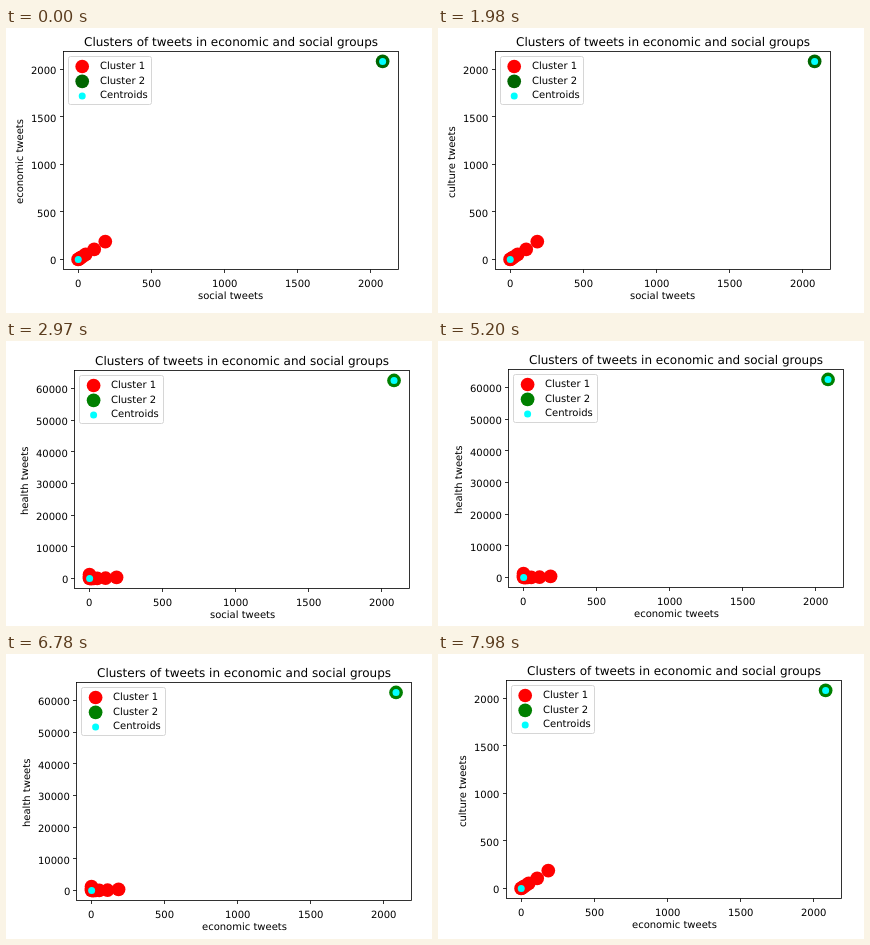
Animation of 426x285 px, one loop 8000 ms. Source, as an HTML page with a canvas:

```html
<!DOCTYPE html>
<html lang="en">
<head>
<meta charset="utf-8">
<title>Tweet clusters</title>
<style>
  html, body { margin: 0; width: 100%; height: 100%; overflow: hidden; background: #fff; }
  canvas { display: block; width: 426px; height: 285px; }
</style>
</head>
<body>
<canvas id="stage" width="426" height="285"></canvas>
<script>
const ctx = document.getElementById('stage').getContext('2d');
const LOOP = 8000;
const WIDTH = 335, HEIGHT = 218, X_UNIT = 0.1462;
const BIG = 6.87, SMALL = 3.5;
const RED = '#ff0000', CYAN = '#00ffff', INK = '#000';

// Each y scale: tick step, last tick, pixels per unit and the far cluster's value.
const HUNDREDS = { step: 500, last: 2000, unit: 0.095, far: 2084, labelGap: 40,
  points: [[0, 0], [4, 3], [10, 8], [18, 18], [34, 33], [52, 52], [110, 105], [186, 188]] };
const THOUSANDS = { step: 10000, last: 60000, unit: 0.095 / 30, far: 62500, labelGap: 46,
  points: [[0, 1200], [0, 500], [0, 0], [12, -100], [30, 0], [53, 0], [110, 50], [185, 300]] };

const SCENES = [
  { at: 0, left: 57, top: 23, x: 'social', y: 'economic', scale: HUNDREDS, green: '#006600' },
  { at: 500, left: 57, top: 23, x: 'social', y: 'culture', scale: HUNDREDS, green: '#006600' },
  { at: 2970, left: 68.4, top: 29, x: 'social', y: 'health', scale: THOUSANDS, green: '#008000' },
  { at: 5200, left: 70.4, top: 28, x: 'economic', y: 'health', scale: THOUSANDS, green: '#008000' },
  { at: 7830, left: 70.4, top: 28, x: 'economic', y: 'health', scale: THOUSANDS, green: '#008000', pointer: true },
  { at: 7980, left: 68, top: 26, x: 'economic', y: 'culture', scale: HUNDREDS, green: '#008000' }
];

const snap = v => Math.floor(v) + 0.5;

function dot(x, y, radius, color) {
  ctx.fillStyle = color;
  ctx.beginPath();
  ctx.arc(x, y, radius, 0, Math.PI * 2);
  ctx.fill();
}

// Text starts on a whole pixel; anchor is 0 for left, 0.5 for centre, 1 for right.
function text(label, x, y, anchor = 0.5, size = 10) {
  ctx.font = `${size}px "DejaVu Sans", sans-serif`;
  ctx.fillStyle = INK;
  const width = ctx.measureText(label).width;
  ctx.fillText(label, Math.round(x - width * anchor), Math.round(y));
}

function line(x1, y1, x2, y2) {
  ctx.beginPath();
  ctx.moveTo(x1, y1);
  ctx.lineTo(x2, y2);
  ctx.stroke();
}

function drawData(scene, originX, originY) {
  const { points, unit, far } = scene.scale;
  const plot = (x, y, radius, color) =>
    dot(originX + x * X_UNIT, originY - y * unit, radius, color);
  points.forEach(([x, y]) => plot(x, y, BIG, RED));
  plot(2083, far, BIG, scene.green);
  plot(1, 0, SMALL, CYAN);
  plot(2083, far, SMALL, CYAN);
}

function drawAxes(scene, originX, originY) {
  const { left, top, scale } = scene;
  const bottom = top + HEIGHT;
  const edge = snap(left);
  ctx.strokeStyle = INK;
  ctx.lineWidth = 0.8;
  ctx.strokeRect(edge, top + 0.5, WIDTH, HEIGHT);
  for (let value = 0; value <= 2000; value += 500) {
    const x = originX + value * X_UNIT;
    line(snap(x), bottom + 0.5, snap(x), bottom + 4);
    text(value, x, bottom + 18);
  }
  for (let value = 0; value <= scale.last; value += scale.step) {
    const y = originY - value * scale.unit;
    line(edge - 3.5, snap(y), edge, snap(y));
    text(value, left - 6.5, y + 4.8, 1);
  }
  text(scene.x + ' tweets', left + 168, bottom + 30);
  ctx.save();
  ctx.translate(Math.round(left - scale.labelGap), top + HEIGHT / 2 + 2);
  ctx.rotate(-Math.PI / 2);
  text(scene.y + ' tweets', 0, 0);
  ctx.restore();
  text('Clusters of tweets in economic and social groups', left + 167.6, top - 5, 0.5, 12);
}

function drawLegend({ left, top, green }) {
  const boxLeft = snap(left + 5);
  ctx.beginPath();
  ctx.roundRect(boxLeft, top + 5.5, snap(left + 88.7) - boxLeft, 48, 2);
  ctx.fillStyle = 'rgba(255,255,255,0.8)';
  ctx.fill();
  ctx.strokeStyle = '#d6d6d6';
  ctx.lineWidth = 1;
  ctx.stroke();
  const rows = [['Cluster 1', RED, BIG], ['Cluster 2', green, BIG], ['Centroids', CYAN, SMALL]];
  rows.forEach(([label, color, radius], i) => {
    dot(left + 19.2, top + 15.5 + i * 14.8, radius, color);
    text(label, left + 36.8, top + 18.2 + i * 14.6, 0);
  });
}

function draw(time) {
  const scene = SCENES.findLast(s => s.at <= time);
  const originX = scene.left + 15.1;
  const originY = scene.top + HEIGHT - 9.6;
  ctx.fillStyle = '#fff';
  ctx.fillRect(0, 0, 426, 285);
  drawData(scene, originX, originY);
  drawAxes(scene, originX, originY);
  drawLegend(scene);
  if (scene.pointer) dot(319, 294, 12, '#ffff6e');
}

ctx.textRendering = 'geometricPrecision';
const start = performance.now();
function tick() {
  draw((performance.now() - start) % LOOP);
  requestAnimationFrame(tick);
}
tick();
</script>
</body>
</html>
```
